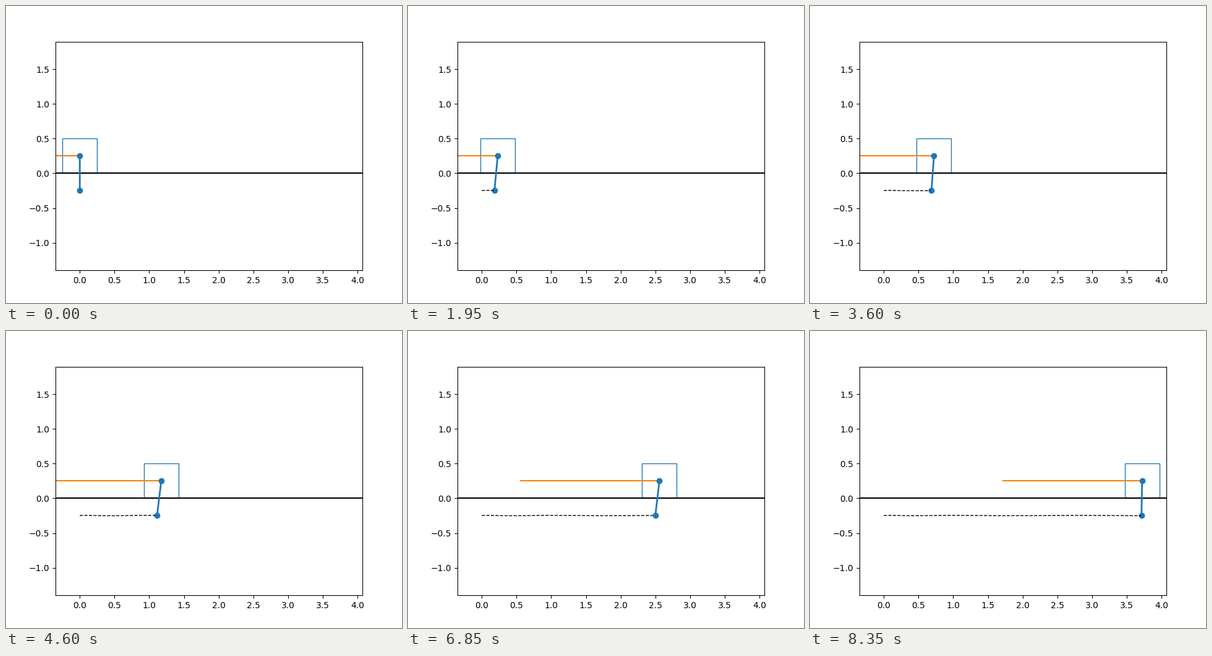
Write a matplotlib script that moves like this. It is 640x480 px and loops after 9.6 s.

```python
import numpy as np
import matplotlib.pyplot as plt
from matplotlib.animation import FuncAnimation
from matplotlib.patches import Rectangle

# Cart with a hanging pendulum, pushed by a constant force
CART, BOB, LENGTH, FORCE, G = 2.0, 1.0, 0.5, 2.0, 9.81
SIDE = 0.5
DT = 0.02
STEPS = 167
FRAMES, INTERVAL = 192, 50


def rates(state):
    x, phi, v, w = state
    s, c = np.sin(phi), np.cos(phi)
    push = FORCE + BOB * s * (LENGTH * w**2 + G * c)
    acc = push / (CART + BOB * s**2)
    return np.array([v, w, acc, -(acc * c + G * s) / LENGTH])


def rk4(state):
    k1 = rates(state)
    k2 = rates(state + DT / 2 * k1)
    k3 = rates(state + DT / 2 * k2)
    k4 = rates(state + DT * k3)
    return state + DT / 6 * (k1 + 2 * k2 + 2 * k3 + k4)


states = [np.zeros(4)]
for _ in range(STEPS):
    states.append(rk4(states[-1]))
states = np.array(states)

cart_x, phi = states[:, 0], states[:, 1]
pivot_y = SIDE / 2
bob_x = cart_x + LENGTH * np.sin(phi)
bob_y = pivot_y - LENGTH * np.cos(phi)

fig, ax = plt.subplots(figsize=(6.4, 4.8), dpi=100)
left, right = -0.35, cart_x[-1] + 0.35
half = (right - left) * 369.6 / 496 / 2
ax.set_xlim(left, right)
ax.set_ylim(pivot_y - half, pivot_y + half)

box = ax.add_patch(Rectangle((-SIDE / 2, 0), SIDE, SIDE, fill=False,
                             edgecolor="C0", lw=1))
ax.axhline(0, color="black", lw=1.5)
force, = ax.plot([], [], color="C1", lw=1.5)
pole, = ax.plot([], [], "o-", color="C0", lw=2)
trail, = ax.plot([], [], "--", color="black", lw=1)


def draw(frame):
    i = min(frame + 1, STEPS)
    x = cart_x[i]
    box.set_x(x - SIDE / 2)
    force.set_data([x - FORCE, x], [pivot_y, pivot_y])
    pole.set_data([x, bob_x[i]], [pivot_y, bob_y[i]])
    n = min(frame, STEPS) + 1
    trail.set_data(bob_x[:n], bob_y[:n])
    return box, force, pole, trail


anim = FuncAnimation(fig, draw, frames=FRAMES, interval=INTERVAL,
                     init_func=lambda: draw(0), repeat=True, repeat_delay=0)
plt.show()
```
